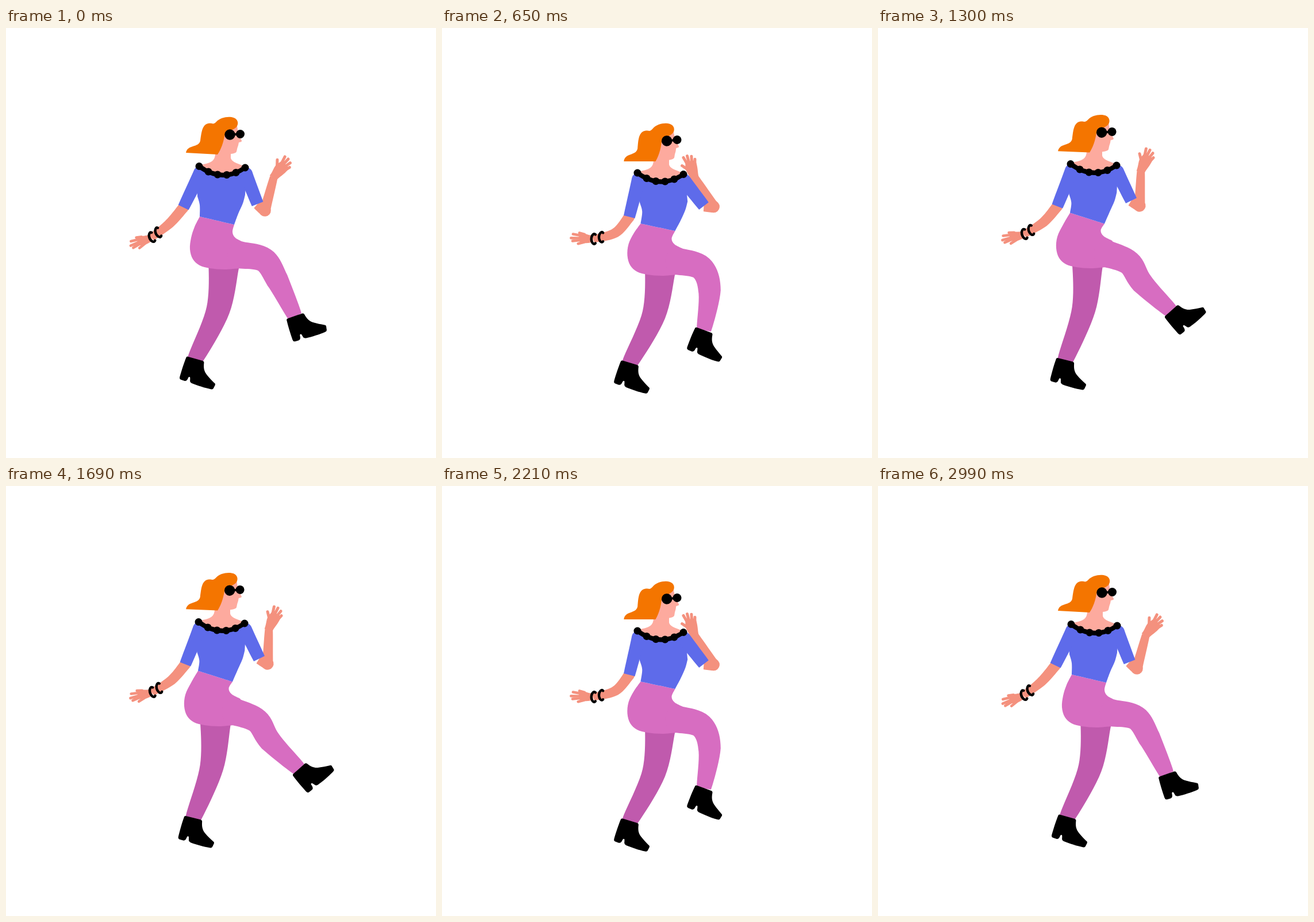
Recreate the animation shown at these times as an HTML page. Size 748 px wide and 748 px high, loop 3120 ms.

```html
<!DOCTYPE html>
<html lang="en">
<head>
<meta charset="utf-8">
<title>Dancing woman</title>
<style>
html, body { margin: 0; width: 100%; height: 100%; overflow: hidden; background: #fff; }
svg { display: block; width: 100vw; height: 100vh; }
</style>
</head>
<body>
<svg viewBox="0 0 748 748" xmlns="http://www.w3.org/2000/svg">
  <defs>
    <path id="boot" d="M0 1Q1-1 4 0L29 7Q31 8 31 10C30 19 31 25 36 31C40 36 45 41 49 45Q52 47 50 50L48 54Q47 57 43 56C33 54 20 50 10 46Q6 44 7 40L7 36Q5 33 3 38Q1 43-3 42L-9 40Q-12 39-11 35C-8 24-4 11 0 1Z"/>
    <path id="bangle" d="M3-8Q0-11-3-5Q-5 2-1 7Q2 10 4 7" fill="none" stroke="#000" stroke-width="4.4" stroke-linecap="round"/>
  </defs>
  <path id="backLeg" fill="#c05aad"/>
  <use id="backBoot" href="#boot"/>
  <g fill="#f4917e" stroke-linecap="round">
    <path id="backArm"/>
    <g id="backHand">
      <path d="M0-6C-8-5-14-9-18-8L-26-2L-24 6L-14 8C-8 8-4 6 0 6Z"/>
      <path d="M-16-7L-25-9M-18-4L-36-6M-20 0L-39 1M-20 3L-36 6M-14 6L-26 10" stroke="#f4917e" stroke-width="4.6"/>
      <use href="#bangle"/>
      <use href="#bangle" x="13" y="-4"/>
    </g>
    <path id="frontElbow"/>
    <path id="frontArm"/>
    <g id="frontHand">
      <path d="M-7 3C-8-8-13-14-11-22L-9-30L5-30L9-27C10-15 7-8 7 0Z"/>
      <path d="M-9-18L-16-26M-7-28L-10-39M-3-28L-3-40M2-28L4-37.5M6-22L8.5-31" stroke="#f4917e" stroke-width="5"/>
    </g>
  </g>
  <g fill="#d76dc1">
    <path id="hips"/>
    <path id="frontLeg"/>
  </g>
  <use id="frontBoot" href="#boot"/>
  <g fill="#5e6bea">
    <path id="body"/>
    <path id="backSleeve"/>
    <path id="frontSleeve"/>
  </g>
  <g id="collar">
    <path fill="#fdaa9e" d="M364 205L364 219C363 232 357 234 340 238C350 248 365 254 378 254C395 253 405 248 414 240C400 235 392 232 391 226L391 205Z"/>
    <path d="M336 240.5Q376 270 416 243" fill="none" stroke="#000" stroke-width="8" stroke-linecap="round"/>
  </g>
  <g id="head">
    <path fill="#fdaa9e" d="M366 219L378 185L398 168L402 170C403 178 405 187 410 196Q411 198 405 199L404 204Q402 209 401 215Q400 218 391 219Z"/>
    <path fill="#f47500" d="M313 217C316 202 335 209 338 196C340 182 341 168 352 166C360 165 360 169 366 163C373 155 388 153 396 156C404 159 405 167 401 172C395 179 383 178 380 188C378 200 374 211 368 220Z"/>
    <path d="M390 185.5L408 184.5" stroke="#000" stroke-width="4"/>
    <circle cx="389.5" cy="185.5" r="9.2"/>
    <circle cx="407.5" cy="184.5" r="7.5"/>
  </g>
</svg>
<script>
const stepMs = 130, lastStep = 5;
const part = id => document.getElementById(id);
const add = (p, q) => [p[0] + q[0], p[1] + q[1]];
const mean = (p, q) => [(p[0] + q[0]) / 2, (p[1] + q[1]) / 2];
const shift = (by, ...points) => points.map(p => add(p, by));

function polar(from, length, degrees) {
  const a = degrees * Math.PI / 180;
  return [from[0] + length * Math.cos(a), from[1] + length * Math.sin(a)];
}

// Joints of a limb: each bone is [length, direction].
const chain = (root, ...bones) =>
  bones.reduce((joints, [length, angle]) => [...joints, polar(joints.at(-1), length, angle)], [root]);

// Smooth runs of points that meet at sharp corners.
function outline(...runs) {
  let d = "M" + runs[0][0], last;
  for (const run of runs) {
    const pts = last ? [last, ...run] : run;
    for (let i = 1; i < pts.length; i++) {
      const b = pts[i - 1], c = pts[i], a = pts[i - 2] || b, e = pts[i + 1] || c;
      const out = b.map((v, n) => v + (c[n] - a[n]) / 6);
      const into = c.map((v, n) => v - (e[n] - b[n]) / 6);
      d += `C${out} ${into} ${c}`;
    }
    last = pts.at(-1);
  }
  return d + "Z";
}

// Tapered band along a smooth curve, round at its first joint, cut flat at its last.
function ribbon(joints, radii) {
  const spine = [], perBone = 10;
  for (let i = 0; i < joints.length - 1; i++) {
    const b = joints[i], c = joints[i + 1], a = joints[i - 1] || b, e = joints[i + 2] || c;
    for (let j = i ? 1 : 0; j <= perBone; j++) {
      const t = j / perBone, u = 1 - t;
      const [x, y] = b.map((v, n) => v * u ** 3 + 3 * u * u * t * (v + (c[n] - a[n]) / 6)
        + 3 * u * t * t * (c[n] - (e[n] - v) / 6) + c[n] * t ** 3);
      spine.push([x, y, radii[i] * u + radii[i + 1] * t]);
    }
  }
  const side = sign => spine.map(([x, y, r], i) => {
    const p = spine[i - 1] || spine[i], q = spine[i + 1] || spine[i];
    const dx = q[0] - p[0], dy = q[1] - p[1], k = sign * r / Math.hypot(dx, dy);
    return [x - dy * k, y + dx * k];
  });
  const left = side(1), right = side(-1).reverse();
  return `M${left.join("L")}L${right.join("L")}A${radii[0]} ${radii[0]} 0 0 0 ${left[0]}Z`;
}

function place(id, [x, y], angle = 0, [px, py] = [0, 0]) {
  part(id).setAttribute("transform", `translate(${x} ${y}) rotate(${angle}) translate(${-px} ${-py})`);
}

function draw(step) {
  // Cubic through the values at steps 0, 1, 3 and 5.
  const knots = [0, 1, 3, lastStep];
  const weights = knots.map(a => knots.reduce((w, b) => b === a ? w : w * (step - b) / (a - b), 1));
  const through = (...values) => values.reduce((sum, v, i) => sum + v * weights[i], 0);
  const eased = 1 - (1 - step / lastStep) ** 1.4;
  const sway = (from, to) => from + (to - from) * eased;
  const shape = (id, d) => part(id).setAttribute("d", d);

  const chest = [through(0, -1, -0.5, 4), through(0, -4, -3.5, 11.5)];
  const pelvis = [through(0, -10, -13, 2.5), through(0, -2, -0.5, 11)];
  const waist = [through(0, -3, -2, 8.5), chest[1]];
  const belly = mean(waist, pelvis);
  const ribs = add(mean(chest, waist), [sway(0, 5), 0]);
  const tilt = pelvis[0] / 4;
  const waistBack = add(waist, [337, 328 + tilt]);
  const waistFront = add(waist, [397, 342 - tilt]);

  shape("body", outline(
    shift(chest, [419, 243], [332, 241]),
    shift(ribs, [333, 293]),
    [...shift(ribs, [337, 308]), waistBack],
    [waistFront],
    shift(ribs, [404, 323], [412, 305], [416, 290]),
    shift(chest, [419, 243])));
  shape("hips", outline(
    [waistBack, waistFront],
    shift(belly, [394, 355], [399, 365], [414, 373]),
    shift(pelvis, [425, 395]),
    shift(pelvis, [406, 418]),
    [...shift(pelvis, [380, 420], [355, 418], [337, 413], [325, 402], [320, 385], [322, 365]),
      ...shift(belly, [328, 346]), waistBack]));

  const ankleTop = [15.5, 4];
  const shin = through(64, 44, 52, 98);
  const frontLeg = chain(add(pelvis, [409, 395]),
    [41, through(12, 22.5, 28, 16)], [42, through(57, 57, 66, 70)], [70, shin]);
  shape("frontLeg", ribbon(frontLeg, [23.5, 21.5, 19.5, 12.5]));
  place("frontBoot", frontLeg.at(-1), 1.15 * (shin - 94), ankleTop);

  // The standing leg is built upwards from its foot.
  const lean = through(-65, -70, -70, -63.5);
  const backLeg = chain([through(329, 325.5, 322, 326.5), through(576, 578, 579, 583)],
    [94, lean], [80, lean / 2 - 50]);
  shape("backLeg", ribbon(backLeg, [13.5, 20.5, 27]));
  place("backBoot", backLeg[0], 0.4 * (lean + 66), ankleTop);

  const [backShoulder, backCuff, backElbow, backWrist] = chain(add(chest, [338, 252]),
    [67, through(116, 112, 105.5, 104)], [36.5, 131], [40, sway(142, 164)]);
  shape("backSleeve", ribbon([backShoulder, backCuff], [12, 10]));
  shape("backArm", ribbon([backCuff, backElbow, backWrist], [9.5, 8.5, 6.2]));
  place("backHand", backWrist, sway(-20, 4));

  const [frontShoulder, frontCuff, frontElbow, frontWrist] = chain(add(chest, [417, 254]),
    [56, sway(68.5, 52)], [17, sway(41, 4)], [60, sway(-75, -123)]);
  shape("frontSleeve", ribbon([frontShoulder, frontCuff], [12, 10.5]));
  shape("frontElbow", ribbon([frontElbow, frontCuff], [10.5, 9.5]));
  shape("frontArm", ribbon([frontElbow, frontWrist], [9.5, 6.8]));
  place("frontHand", frontWrist, sway(43, -15));

  place("collar", chest);
  const neck = [389.5, 185.5];
  place("head", add(neck, [chest[0] * 0.4, chest[1] * 0.95]), sway(0, -3), neck);
}

// Scallops hang along the collar's curve.
for (let i = 0; i <= 5; i++) {
  const t = i / 5;
  const scallop = document.createElementNS("http://www.w3.org/2000/svg", "circle");
  scallop.setAttribute("cx", 336 + 80 * t);
  scallop.setAttribute("cy", 240.5 + 2.5 * t + 56 * t * (1 - t));
  scallop.setAttribute("r", 6.5);
  part("collar").append(scallop);
}

const start = performance.now();
let shown = -1;

// The swing runs there and back, resting two steps at each end.
function tick() {
  const n = Math.floor((performance.now() - start) / stepMs) % 12;
  const step = Math.min(n, 11 - n);
  if (step !== shown) draw(shown = step);
  requestAnimationFrame(tick);
}
tick();
</script>
</body>
</html>
```
